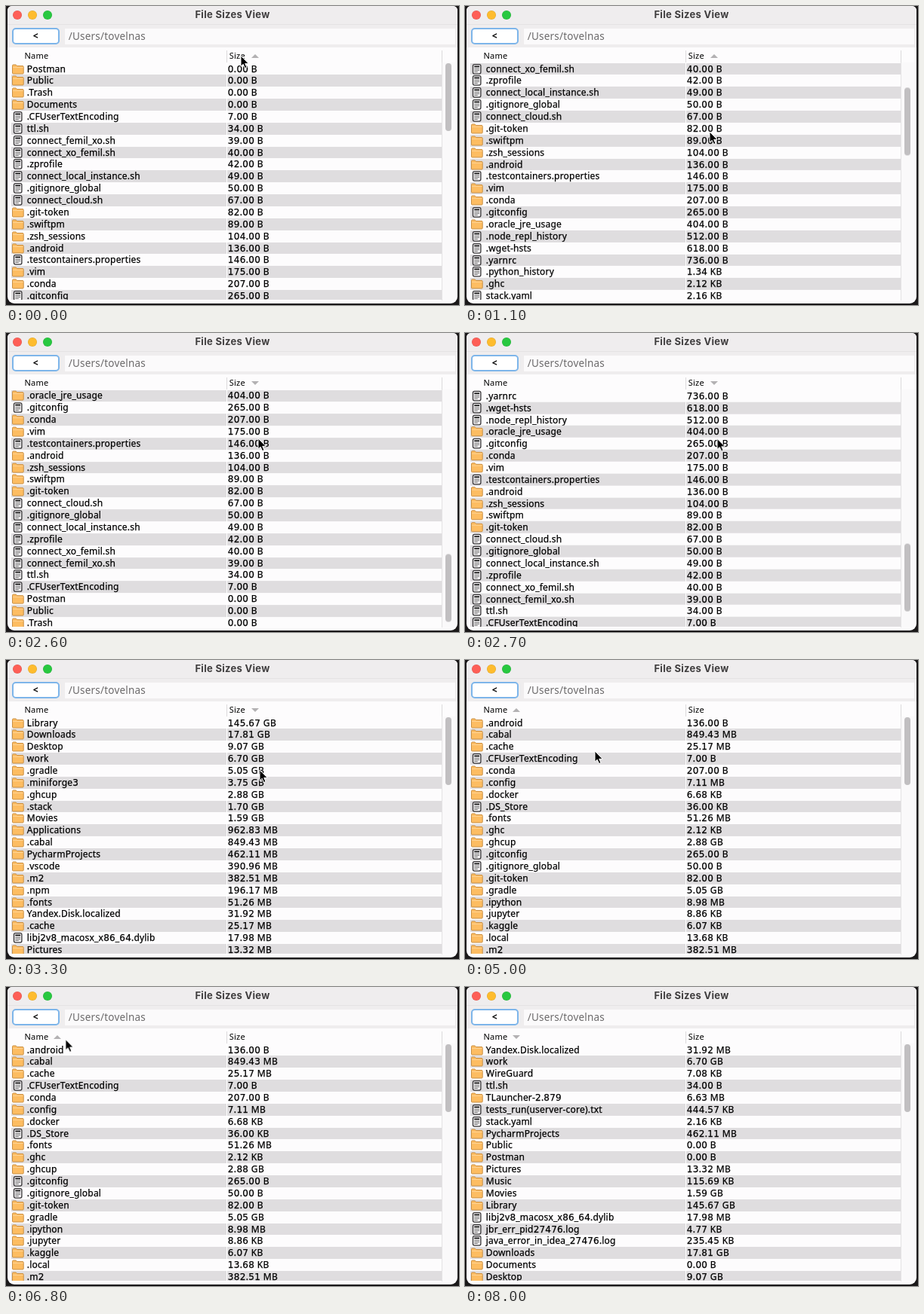
An HTML page that plays this animation: 600x397 px, repeating every 8100 ms.

```html
<!DOCTYPE html>
<html lang="en">
<head>
<meta charset="utf-8">
<title>File Sizes View</title>
<style>
  html, body { margin: 0; width: 100%; height: 100%; overflow: hidden; background: #1b191a; }
  #stage { position: relative; width: 600px; height: 397px; overflow: hidden; background: #1b191a;
    font: 12px/16px "Noto Sans", "Open Sans", sans-serif; letter-spacing: .2px; color: #000; white-space: nowrap; }
  #stage * { box-sizing: border-box; }
  #stage div, #stage svg, #stage span { position: absolute; }
  #win { left: 2px; top: 0; width: 596px; height: 395px; border-radius: 6px 6px 9px 9px;
    background: #fdfcfd; overflow: hidden; }
  #bar { left: 0; top: 0; width: 100%; height: 55px; background: #efedee; }
  #edge { left: 0; top: 24px; width: 100%; height: 1px; background: #e4e2e3; }
  #title { left: 0; width: 100%; top: 3px; text-align: center; color: #3f3d3e;
    font: 700 13px/17px Inter, sans-serif; letter-spacing: .3px; }
  .light { top: 6px; width: 12px; height: 12px; border-radius: 50%; box-shadow: inset 0 0 0 .5px #0002; }
  #back { left: 6px; top: 29px; width: 62.5px; height: 21.5px; border: 2px solid #7db5ea; border-radius: 5px;
    background: #fff; text-align: center; font-weight: 700; line-height: 18px; }
  #path { left: 76px; top: 30px; width: 517px; height: 21px; padding-left: 4.8px; background: #fbfafb;
    color: #6c6a6b; font-size: 13.5px; line-height: 20px; }
  .head { top: 58px; font-size: 11px; }
  .rule { top: 59px; width: 1px; height: 16px; background: #dcdadc; }
  #view { left: 5px; top: 75.5px; width: 570px; height: 314.5px; overflow: hidden; }
  #scroll, .list { left: 0; top: 0; width: 570px; }
  .row { left: 0; width: 570px; height: 15.87px; line-height: 15px; -webkit-text-stroke: .25px #000; }
  .row:nth-child(even) { background: #dfdddf; }
  .row::after { content: ""; position: absolute; left: 285px; top: 0; width: 1px; height: 100%; background: #fff; }
  .row svg { left: 0; top: 0; }
  .row i { font: 12px/1 "DejaVu Sans", sans-serif; }
  .name { left: 20.8px; }
  .size { left: 286.8px; letter-spacing: .35px; }
  #track { left: 575px; top: 75px; width: 18px; height: 316px; border-left: 1px solid #e4e2e4; background: #faf9fa; }
  #thumb { left: 580px; top: 76px; width: 8px; height: 90px; border-radius: 4px; background: #c1bfc1; }
  #cursor { left: -1px; top: -1px; }
</style>
</head>
<body>
<div id="stage">
  <div id="win">
    <div id="bar"></div>
    <div id="edge"></div>
    <div class="light" style="left:7.3px;background:#fe5f57"></div>
    <div class="light" style="left:27.3px;background:#febc2e"></div>
    <div class="light" style="left:47.3px;background:#28c840"></div>
    <div id="title">File Sizes View</div>
    <div id="back">&lt;</div>
    <div id="path">/Users/tovelnas</div>
    <div class="head" style="left:22.5px">Name</div>
    <div class="head" style="left:293.8px">Size</div>
    <div class="rule" style="left:290px"></div>
    <div class="rule" style="left:575px"></div>
    <div id="view"><div id="scroll"></div></div>
    <div id="track"></div>
    <div id="thumb"></div>
  </div>
  <svg id="cursor" width="14" height="20" viewBox="-1 -1 14 20">
    <path d="M0 0V14.2L3.2 11.3L5.6 16.6L8 15.5L5.7 10.4H10.2Z" fill="#000" stroke="#fff" stroke-width="1"/>
  </svg>
</div>
<script>
const LOOP = 8100, STEP = 100, ROW = 15.87, VIEW = 314.5;

// In name order; * marks a plain file
const files = `.android|136.00 B
.cabal|849.43 MB
.cache|25.17 MB
*.CFUserTextEncoding|7.00 B
.conda|207.00 B
.config|7.11 MB
.docker|6.68 KB
*.DS_Store|36.00 KB
.fonts|51.26 MB
.ghc|2.12 KB
.ghcup|2.88 GB
*.gitconfig|265.00 B
*.gitignore_global|50.00 B
.git-token|82.00 B
.gradle|5.05 GB
.ipython|8.98 MB
.jupyter|8.86 KB
.kaggle|6.07 KB
.local|13.68 KB
.m2|382.51 MB
.matplotlib|31.24 KB
.miniforge3|3.75 GB
*.node_repl_history|512.00 B
.npm|196.17 MB
.oh-my-zsh|9.15 MB
.oracle_jre_usage|404.00 B
*.python_history|1.34 KB
.ssh|5.21 KB
.stack|1.70 GB
.swiftpm|89.00 B
*.testcontainers.properties|146.00 B
.Trash|0.00 B
.vim|175.00 B
*.viminfo|12.40 KB
.vscode|390.96 MB
*.wget-hsts|618.00 B
*.yarnrc|736.00 B
*.zcompdump|48.92 KB
*.zprofile|42.00 B
*.zsh_history|64.15 KB
.zsh_sessions|104.00 B
*.zshrc|4.05 KB
*.zshrc.bak|3.87 KB
Applications|962.83 MB
*connect_cloud.sh|67.00 B
*connect_femil_xo.sh|39.00 B
*connect_local_instance.sh|49.00 B
*connect_xo_femil.sh|40.00 B
Desktop|9.07 GB
Documents|0.00 B
Downloads|17.81 GB
*java_error_in_idea_27476.log|235.45 KB
*jbr_err_pid27476.log|4.77 KB
*libj2v8_macosx_x86_64.dylib|17.98 MB
Library|145.67 GB
Movies|1.59 GB
Music|115.69 KB
Pictures|13.32 MB
Postman|0.00 B
Public|0.00 B
PycharmProjects|462.11 MB
*stack.yaml|2.16 KB
*tests_run(userver-core).txt|444.57 KB
TLauncher-2.879|6.63 MB
*ttl.sh|34.00 B
WireGuard|7.08 KB
work|6.70 GB
Yandex.Disk.localized|31.92 MB`.split("\n").map(line => {
  const [label, size] = line.split("|"), [num, unit] = size.split(" ");
  return {
    file: label[0] === "*", name: label.replace("*", ""), size,
    bytes: num * 1024 ** "BKMG".indexOf(unit[0])
  };
});

const empty = ["Postman", "Public", ".Trash", "Documents"];
const tie = (a, b) => empty.indexOf(a.name) - empty.indexOf(b.name);
const bySize = dir => [...files].sort((a, b) => dir * (a.bytes - b.bytes) || tie(a, b));

const folderIcon = `<svg width="18" height="16"><path d="M1.5 3.2Q1.5 2 2.7 2H6.2L7.7 3.6H15Q16.2 3.6 16.2 4.8V13Q16.2 14 15.2 14H2.5Q1.5 14 1.5 13Z" fill="#fdbd62" stroke="#c98f43"/><path d="M2 5.5H15.7" stroke="#ffd394"/></svg>`;
const fileIcon = `<svg width="18" height="16"><rect x="3.5" y="1.7" width="10.4" height="12.4" rx="2" fill="#f4f2f4" stroke="#353335" stroke-width="1.3"/><path d="M5.3 4.5H12.1" stroke="#222" stroke-width="2"/><path d="M5.3 7.5H12.1M5.3 9.5H12.1M5.3 11.5H9.8" stroke="#777"/></svg>`;
const digits = s => s.replace(/\d+/g, "<i>$&</i>");

const $ = id => document.getElementById(id);
const add = (parent, cls, html) => {
  const el = document.createElement("div");
  el.className = cls;
  el.innerHTML = html;
  return parent.appendChild(el);
};
const play = (el, frames) => el.animate(frames, { duration: LOOP, iterations: Infinity });

// Show an element only from start to end
function show(el, start, end) {
  const key = (t, on) => ({ offset: t, visibility: on ? "visible" : "hidden", easing: "step-end" });
  const at = t => Math.max(0, t - 4) / LOOP, frames = [key(0, !start)];
  if (start) frames.push(key(at(start), true));
  if (end < LOOP) frames.push(key(at(end), false));
  frames.push(key(1, end >= LOOP));
  play(el, frames);
}

const orders = [
  { rows: bySize(1), up: true, x: 328, start: 0, end: 2000 },
  { rows: bySize(-1), up: false, x: 328, start: 2000, end: 4400 },
  { rows: files, up: true, x: 66, start: 4400, end: 7100 },
  { rows: [...files].reverse(), up: false, x: 66, start: 7100, end: LOOP }
];
for (const o of orders) {
  const list = add($("scroll"), "list", o.rows.map((f, i) =>
    `<div class="row" style="top:${(i * ROW).toFixed(2)}px">${f.file ? fileIcon : folderIcon}` +
    `<span class="name">${digits(f.name)}</span><span class="size">${digits(f.size)}</span></div>`).join(""));
  const arrow = add($("win"), "", `<svg width="10" height="5"><path d="${o.up ? "M0 5L5 0L10 5Z" : "M0 0L5 5L10 0Z"}" fill="#b3b1b3"/></svg>`);
  arrow.style.cssText = `left:${o.x - 5}px;top:64px`;
  show(list, o.start, o.end);
  show(arrow, o.start, o.end);
}

// Eased value between [time, ...values] keys
function sample(keys, t) {
  const n = keys.findIndex(k => k[0] > t);
  if (n < 0) return keys[keys.length - 1].slice(1);
  const a = keys[n - 1], b = keys[n], p = (t - a[0]) / (b[0] - a[0]), e = p * p * (3 - 2 * p);
  return a.slice(1).map((v, i) => v + (b[i + 1] - v) * e);
}
function track(el, keys, transform) {
  const frames = [];
  for (let t = 0; t <= LOOP; t += STEP)
    frames.push({
      offset: t && t < LOOP ? (t - 4) / LOOP : t / LOOP,
      transform: transform(...sample(keys, t)), easing: "step-end"
    });
  play(el, frames);
}

const total = files.length * ROW, end = (total - VIEW) / ROW;
const rows = [[0, 0], [1000, 0], [1400, 47], [1500, end], [2400, end], [2600, 47], [3200, 0],
  [5000, 0], [5300, end], [5800, end], [6400, 0]];
const snap = v => v > end - 0.1 ? end : Math.round(v);
track($("scroll"), rows, v => `translateY(${-snap(v) * ROW}px)`);
track($("thumb"), rows, v => `translateY(${snap(v) / end * 223}px)`);

track($("cursor"), [[0, 311, 66], [100, 311, 66], [1000, 324, 167], [1500, 324, 167], [1900, 329, 65],
  [2000, 329, 65], [2300, 334, 140], [2600, 334, 140], [3300, 336, 146], [3800, 336, 146],
  [4300, 60, 64], [4500, 60, 64], [4900, 172, 121], [5500, 172, 121], [5700, 172, 118],
  [6400, 172, 118], [6900, 68, 64], [7300, 68, 64], [7900, 228, 400]],
  (x, y) => `translate(${x}px, ${y}px)`);
</script>
</body>
</html>
```
